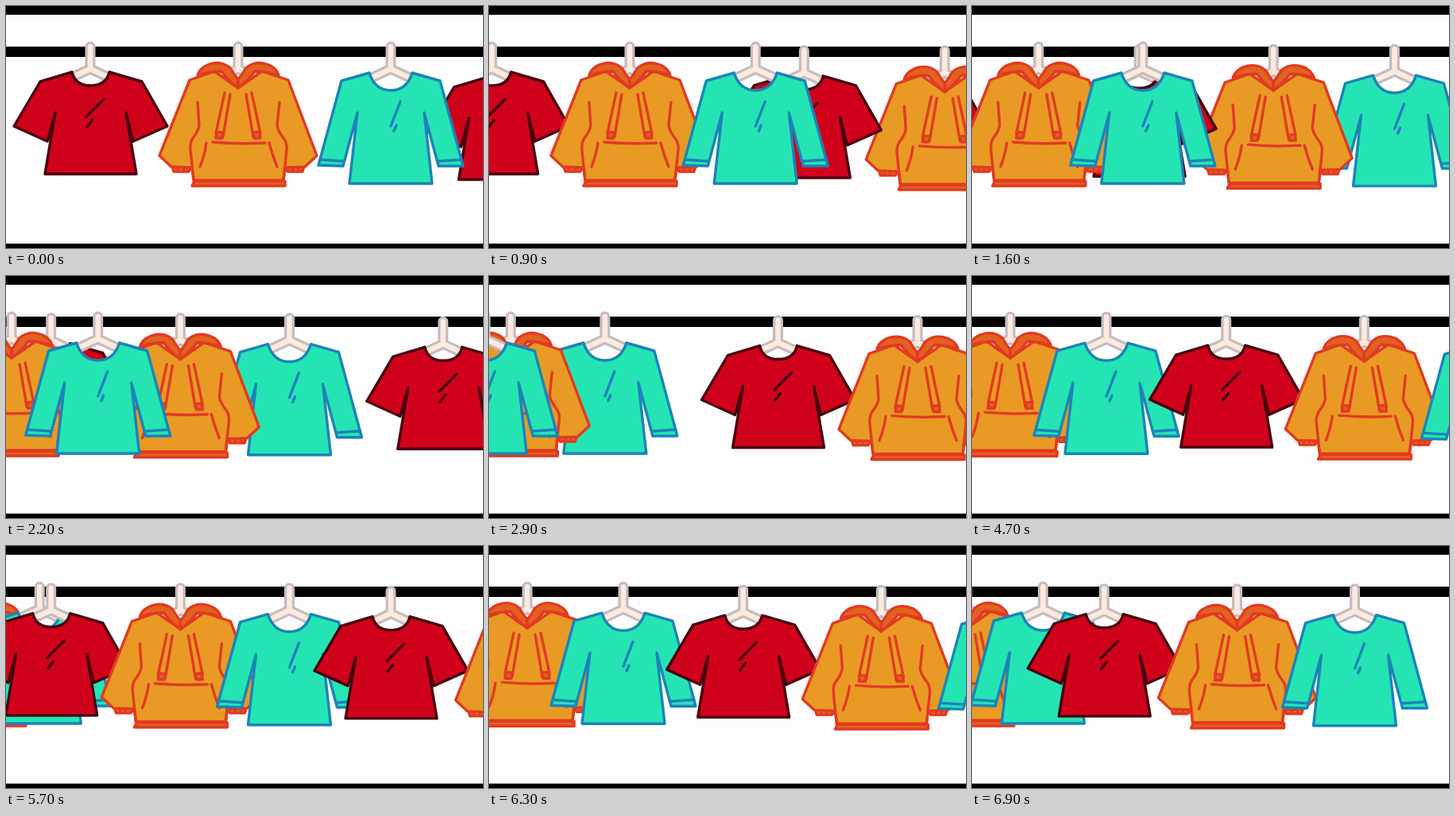
An HTML page that plays this animation: 600 by 304 pixels, repeating every 7000 ms.

```html
<!DOCTYPE html>
<html>
<head>
<meta charset="utf-8">
<style>
  html, body { margin: 0; width: 100%; height: 100%; overflow: hidden; background: #fdfdfd; }
  svg { display: block; width: 600px; height: 304px; overflow: hidden; }
  path { stroke-linecap: round; stroke-linejoin: round; }
  #tee path { stroke: #47000f; stroke-width: 3.4; fill: #d0021b; }
  #hoodie path { stroke: #e23a22; stroke-width: 3.4; fill: #e89a24; }
  #longTee path { stroke: #1b84b8; stroke-width: 3.4; fill: #25e4b4; }
  #hoodie .dark { fill: #e2621f; }
  #hanger path { fill: none; }
  #tee .line, #hoodie .line, #longTee .line { fill: none; }
</style>
</head>
<body>
<svg viewBox="0 0 600 304">
  <defs>
    <g id="hanger">
      <path d="M0 51V79M-26 91L0 79L26 91" stroke="#c5bcbf" stroke-width="13"/>
      <path d="M0 51V79M-26 91L0 79L26 91" stroke="#fdeade" stroke-width="6.5"/>
    </g>
    <g id="tee">
      <use href="#hanger"/>
      <path d="M-23 83L-63 95L-96 151L-54 170L-44 134L-57 211H58L45 134L54 170L97 151L65 95L24 83Q20 100 0 100Q-19 100 -23 83Z"/>
      <path class="line" d="M17 117L-5 139M3 143L-4 152"/>
    </g>
    <g id="hoodie">
      <use href="#hanger"/>
      <path class="dark" d="M-83 201L-59 203L-62 208L-81 208ZM83 201L59 203L62 208L81 208Z"/>
      <path class="line" d="M-76 205h.1M-69 205h.1M76 205h.1M69 205h.1" stroke-width="2"/>
      <path d="M-61 93L-99 188L-84 202L-58 203L-56 219H57L59 203L84 202L99 188L63 93L30 82L0 103L-30 82Z"/>
      <path class="dark" d="M-51 87C-46 71 -20 66 -9 79Q-5 87 0 92V103Q-14 92 -21 82Q-35 82 -51 87Z"/>
      <path class="dark" d="M51 87C46 71 20 66 9 79Q5 87 0 92V103Q14 92 21 82Q35 82 51 87Z"/>
      <path class="line" d="M-51 121L-49 150Q-50 157 -57 166Q-61 172 -60 181L-56 219M52 121L49 150Q50 157 57 166Q62 172 61 181L57 219"/>
      <path class="dark" d="M-55 220H59L59 226H-58Z"/>
      <path class="line" d="M-17 109L-28 160M-10 111L-19 164M17 109L28 160M10 111L19 164"/>
      <path class="dark" d="M-27 158L-19 159L-20 166L-28 166ZM27 158L19 159L20 166L28 166Z"/>
      <path class="line" d="M-32 171Q0 174 34 172M-40 172Q-42 187 -48 202M39 172Q43 187 49 202"/>
    </g>
    <g id="longTee">
      <use href="#hanger"/>
      <path d="M-27 84L-62 94L-91 200L-60 201L-42 134L-52 223H52L42 134L60 201L91 201L62 94L27 84Q20 106 0 106Q-20 106 -27 84Z"/>
      <path class="line" d="M-89 193L-59 195M89 193L59 195M12 120L0 151M7 150L4 157"/>
    </g>
  </defs>
  <path d="M0 0H600V11H0ZM0 51H600V64H0ZM0 298.5H600V304H0Z"/>
  <g id="rack"></g>
</svg>
<script>
const LOOP = 7000, STEP = 100, FPS = 24;
const rack = document.getElementById("rack");

// x: place at the pivot, fast: speed before it, slow: speed after it (px/s)
const kinds = {
  tee:     { x: -127, fast: 263, slow: 20,  startX: 106, startSpeed: 117 },
  hoodie:  { x: 28,   fast: 274, slow: 67,  startX: 292, startSpeed: 131.5 },
  longTee: { x: 147,  fast: 300, slow: 113, startX: 484, startSpeed: 170 }
};
const order = ["tee", "hoodie", "longTee"];
const items = [];

function addSet(names, place) {
  for (const name of names) {
    const node = document.createElementNS("http://www.w3.org/2000/svg", "use");
    node.setAttribute("href", "#" + name);
    rack.append(node);
    items.push({ node, place: t => place(kinds[name], t) });
  }
}

// Slides in fast while rising, then drifts out slowly from the pivot time.
const arriving = pivot => (kind, t) => {
  const left = pivot - t;
  return left > 0 ? [kind.x + kind.fast * left, 2.44 * left] : [kind.x + kind.slow * left, 0];
};
const leaving = (kind, t) => [kind.startX - kind.startSpeed * t, 0];

addSet([...order].reverse(), arriving(2.865));
addSet(order, leaving);
for (const pivot of [4.74, 6.365, 7.99]) addSet(order, arriving(pivot));

const start = performance.now();
function draw() {
  const elapsed = (performance.now() - start) % LOOP;
  // The picture changes ten times a second, on poses from a 24 fps timeline.
  const step = Math.floor(elapsed / STEP);
  const t = Math.floor(step * STEP * FPS / 1000) / FPS;
  for (const { node, place } of items) {
    node.setAttribute("transform", `translate(${place(t)})`);
  }
  requestAnimationFrame(draw);
}
draw();
</script>
</body>
</html>
```
